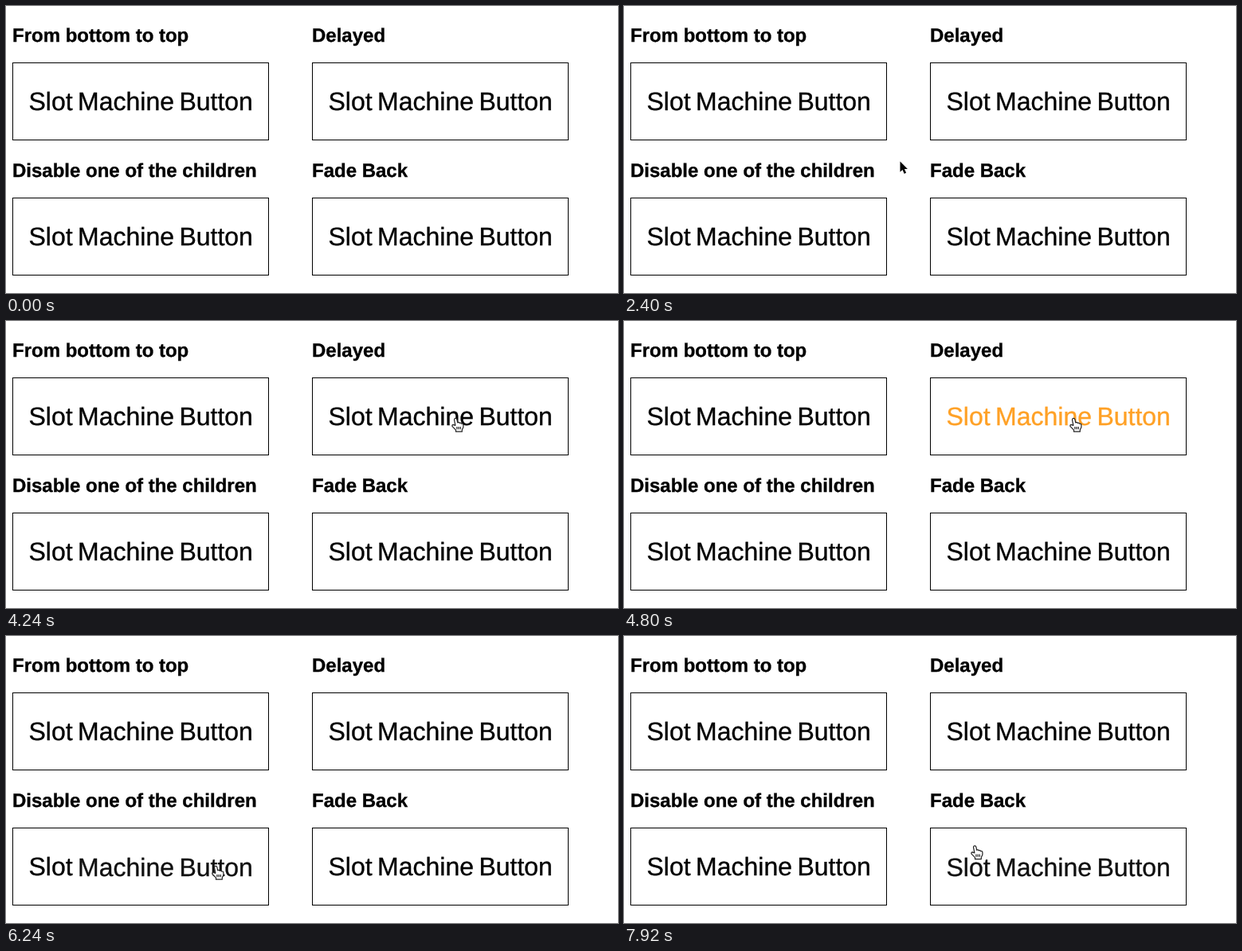
Write an HTML page that moves like this. It is 768 by 361 pixels and loops after 8 s.

```html
<!DOCTYPE html>
<html lang="en">
<head>
<meta charset="utf-8">
<title>Slot Machine Button</title>
<style>
  html, body { margin: 0; width: 100%; height: 100%; overflow: hidden; background: #fff; }
  svg { display: block; font-family: "Liberation Sans", Arial, sans-serif; }
  text { stroke-width: .35px; text-rendering: geometricPrecision; }
  .title { font-size: 24px; font-weight: bold; stroke: #000; }
  .word { font-size: 32px; }
  .frame { fill: none; stroke: #000; }
</style>
</head>
<body>
<svg id="stage" width="768" height="361" viewBox="0 0 768 361">
  <g id="buttons"></g>
  <g id="cursor">
    <path id="arrow" d="M0 0V13.2L3 10.4L5.2 15.4L7.6 14.3L5.4 9.5H9.4Z"
          fill="#000" stroke="#fff" stroke-width="1.2" paint-order="stroke"/>
    <g id="hand" transform="translate(-.3 -.6)" fill="#fff" stroke="#222" stroke-width="1.2" stroke-linejoin="round">
      <path d="M-.8 9.5L-2.2 2.4Q-2.2.6-.7.5T1.2 2L2 6Q3.4 4.9 4.4 6.4Q6 5.6 6.9 7.2Q9 6.6 9.2 9V11.5L7.6 15V17.3H-.2V15.3L-4.6 10.8Q-5.4 8.8-3.4 8.5Z"/>
      <path d="M1.2 11V14.4M3.4 11V14.4M5.6 11V14.4" fill="none"/>
    </g>
  </g>
</svg>
<script>
const LOOP = 8000, STEP = 80, DURATION = 400, TRAVEL = 37;
const PADDING = 20.5, GAP = 6.4, WIDTH = 322, TOP = 71, BOTTOM = 169;

// dir: vertical direction of the roll; enter/leave: when it starts and reverses, in ms
const BUTTONS = [
  { title: "From bottom to top", x: 8, y: 0, dir: -1, enter: 2640, leave: 3645 },
  { title: "Delayed", x: 384, y: 0, dir: 1, enter: 4270, leave: 5330, stagger: 50 },
  { title: "Disable one of the children", x: 8, y: 170, dir: 1, enter: 6220, leave: 7084, fixed: "Slot" },
  { title: "Fade Back", x: 384, y: 170, dir: 1, enter: 7900, leave: Infinity }
];

// The pointer rests between these moves
const APPEAR = { time: 960, x: 350, y: 336 };
const MOVES = [
  { from: 960, to: 1600, x: 346.5, y: 195.5 },
  { from: 2400, to: 3040, x: 262, y: 128 },
  { from: 3440, to: 3680, x: 351, y: 177.5 },
  { from: 3680, to: 4240, x: 565, y: 122.5 },
  { from: 5040, to: 5600, x: 360, y: 196 },
  { from: 5920, to: 6240, x: 264, y: 289.5 },
  { from: 6960, to: 7120, x: 409.5, y: 236.5 },
  { from: 7760, to: 7920, x: 441, y: 264 }
];

const $ = id => document.getElementById(id);
const clamp = v => Math.min(1, Math.max(0, v));
const smooth = p => p * p * (3 - 2 * p);

// cubic-bezier(.25, .1, .25, 1)
function ease(p) {
  let low = 0, high = 1;
  for (let i = 0; i < 20; i++) {
    const u = (low + high) / 2;
    if (0.75 * u * (1 - u) + u ** 3 < p) low = u; else high = u;
  }
  return 0.3 * low * (1 - low) ** 2 + 3 * low * low * (1 - low) + low ** 3;
}

function pointerAt(t) {
  let { x, y } = APPEAR;
  for (const move of MOVES) {
    const k = smooth(clamp((t - move.from) / (move.to - move.from)));
    x += (move.x - x) * k;
    y += (move.y - y) * k;
  }
  return { x, y };
}

function add(parent, tag, attrs, text = "") {
  const node = document.createElementNS("http://www.w3.org/2000/svg", tag);
  for (const key in attrs) node.setAttribute(key, attrs[key]);
  node.textContent = text;
  return parent.appendChild(node);
}

const rollers = [];
for (const b of BUTTONS) {
  const group = add($("buttons"), "g", { transform: `translate(${b.x} ${b.y})` });
  add(group, "text", { class: "title", y: 45 }, b.title);
  add(group, "rect", { class: "frame", x: 0.5, y: TOP + 0.5, width: WIDTH - 1, height: BOTTOM - TOP - 1 });
  let x = PADDING;
  ["Slot", "Machine", "Button"].forEach((word, i) => {
    const face = color => add(group, "text", { class: "word", x, y: 131, fill: color, stroke: color }, word);
    const black = face("#000");
    if (word !== b.fixed) rollers.push({ b, black, orange: face("#ffa126"), delay: i * (b.stagger || 0) });
    x += black.getComputedTextLength() + GAP;
  });
}

function place(node, offset, opacity) {
  node.setAttribute("transform", `translate(0 ${offset})`);
  node.setAttribute("opacity", clamp(opacity));
}

function draw(t) {
  for (const { b, black, orange, delay } of rollers) {
    const progress = start => ease(clamp((t - start - delay) / DURATION));
    const shown = progress(b.enter) - progress(b.leave);
    place(black, b.dir * TRAVEL * shown, 1 - 2 * shown);
    place(orange, b.dir * TRAVEL * (shown - 1), 2 * shown - 1);
  }

  const { x, y } = pointerAt(t);
  const over = BUTTONS.some(b =>
    x >= b.x && x <= b.x + WIDTH && y >= b.y + TOP && y <= b.y + BOTTOM);
  $("cursor").setAttribute("transform", `translate(${x} ${y})`);
  $("cursor").style.display = t < APPEAR.time ? "none" : "";
  $("hand").style.display = over ? "" : "none";
  $("arrow").style.display = over ? "none" : "";
}

const start = performance.now();
function tick() {
  const t = (performance.now() - start) % LOOP;
  draw(Math.floor(t / STEP) * STEP);
  requestAnimationFrame(tick);
}
tick();
</script>
</body>
</html>
```
